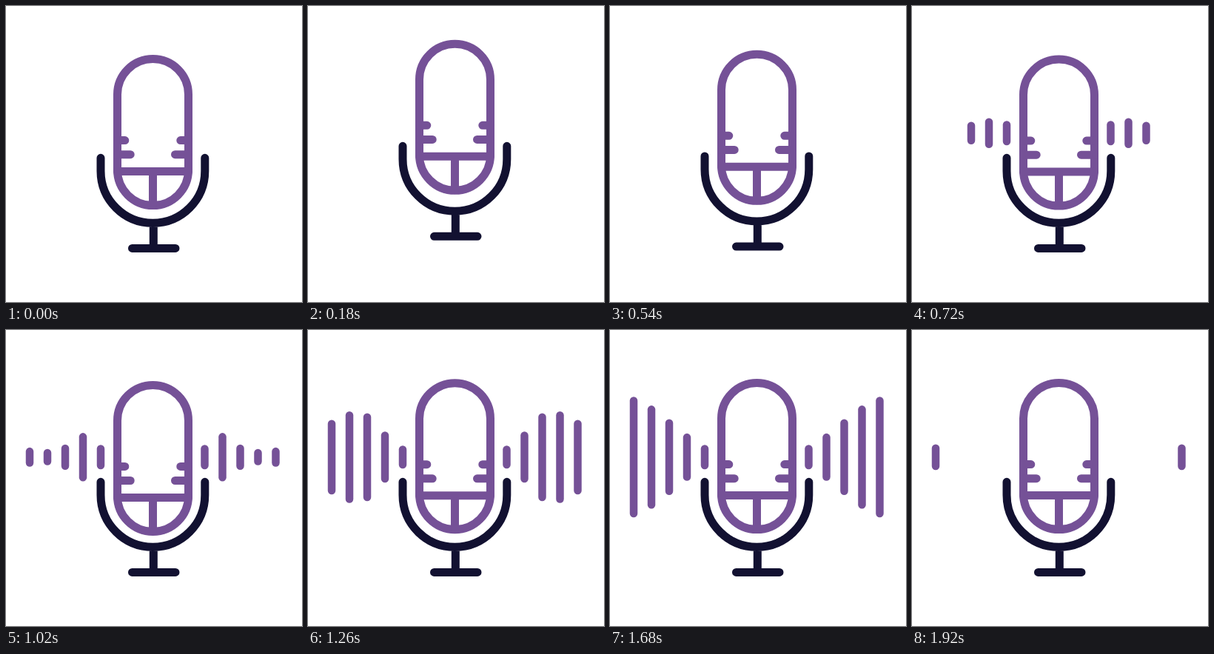
Recreate the animation shown at these times as an HTML page. Size 400x400 px, loop 3950 ms.

```html
<!DOCTYPE html>
<html lang="en">
<head>
<meta charset="utf-8">
<title>Microphone</title>
<style>
  html, body { margin: 0; width: 100%; height: 100%; overflow: hidden; background: #fff; }
  svg { display: block; width: 100%; height: 100%; }
  g { fill: none; stroke-width: 11; stroke-linecap: round; stroke-linejoin: round; }
  .violet { stroke: #755197; }
  .navy { stroke: #121131; }
</style>
</head>
<body>
<svg viewBox="0 0 400 400">
  <g id="waves" class="violet"></g>
  <g id="stand" class="navy">
    <path d="M128 205.3V223a70.4 70.4 0 0 0 140.8 0V205.3M199.3 294V327.4M170.5 327.4H229"/>
  </g>
  <g id="head" class="violet">
    <rect x="150.5" y="71.6" width="96" height="198" rx="48"/>
    <path d="M150.5 223.6H246.5M198.5 223.6V269M150.5 181.6H160.8M150.5 200.7H168.2M246.5 181.6H235.8M246.5 200.7H228.5"/>
  </g>
</svg>
<script>
const LOOP = 3950, STEP = 30, LAST = 1920;
const BARS = 5, GAP = 24, DELAY = 60;
const MID = 171.8, WIDTH = 10.5, INNER_MAX = 33;

// Peaks and troughs of the sound pulse: [time in ms, bar height]
const pulse = [[570, 24], [640, 41], [840, 22], [1110, 127], [1270, 30], [1400, 168], [1740, 24]];

const ease = p => (1 - Math.cos(Math.PI * p)) / 2;

// Height of the pulse, or 0 while it is silent
function pulseAt(t) {
  const i = pulse.findIndex(([time]) => t < time);
  if (i < 1) return 0;
  const [t0, a] = pulse[i - 1], [t1, b] = pulse[i];
  return a + (b - a) * ease((t - t0) / (t1 - t0));
}

// Smooth move by dy and back again between two times
function hop(t, from, to, dy) {
  const p = (t - from) / (to - from);
  return p > 0 && p < 1 ? dy * ease(2 * p) : 0;
}

const byId = id => document.getElementById(id);
const head = byId('head'), stand = byId('stand');

function addBar(x) {
  const line = document.createElementNS('http://www.w3.org/2000/svg', 'line');
  line.setAttribute('x1', x);
  line.setAttribute('x2', x);
  line.setAttribute('stroke-width', WIDTH);
  return byId('waves').appendChild(line);
}

const pairs = Array.from({ length: BARS }, (_, i) => [addBar(128 - i * GAP), addBar(268.5 + i * GAP)]);

const shift = (el, y) => el.setAttribute('transform', `translate(0 ${y})`);

function draw(t) {
  shift(head, hop(t, 0, 630, -33.2) + hop(t, 630, 1300, 3));
  shift(stand, hop(t, 0, 600, -24.5));

  // The pulse travels outwards; the inner pair stays clear of the stand
  pairs.forEach((lines, i) => {
    const wave = pulseAt(t - i * DELAY);
    const height = i ? wave : Math.min(wave, INNER_MAX);
    const half = (height - WIDTH) / 2;
    for (const line of lines) {
      line.setAttribute('visibility', height ? 'visible' : 'hidden');
      line.setAttribute('y1', MID - half);
      line.setAttribute('y2', MID + half);
    }
  });
}

const start = performance.now();
function tick() {
  const t = (performance.now() - start) % LOOP;
  draw(Math.min(LAST, Math.floor(t / STEP) * STEP));
  requestAnimationFrame(tick);
}
tick();
</script>
</body>
</html>
```
